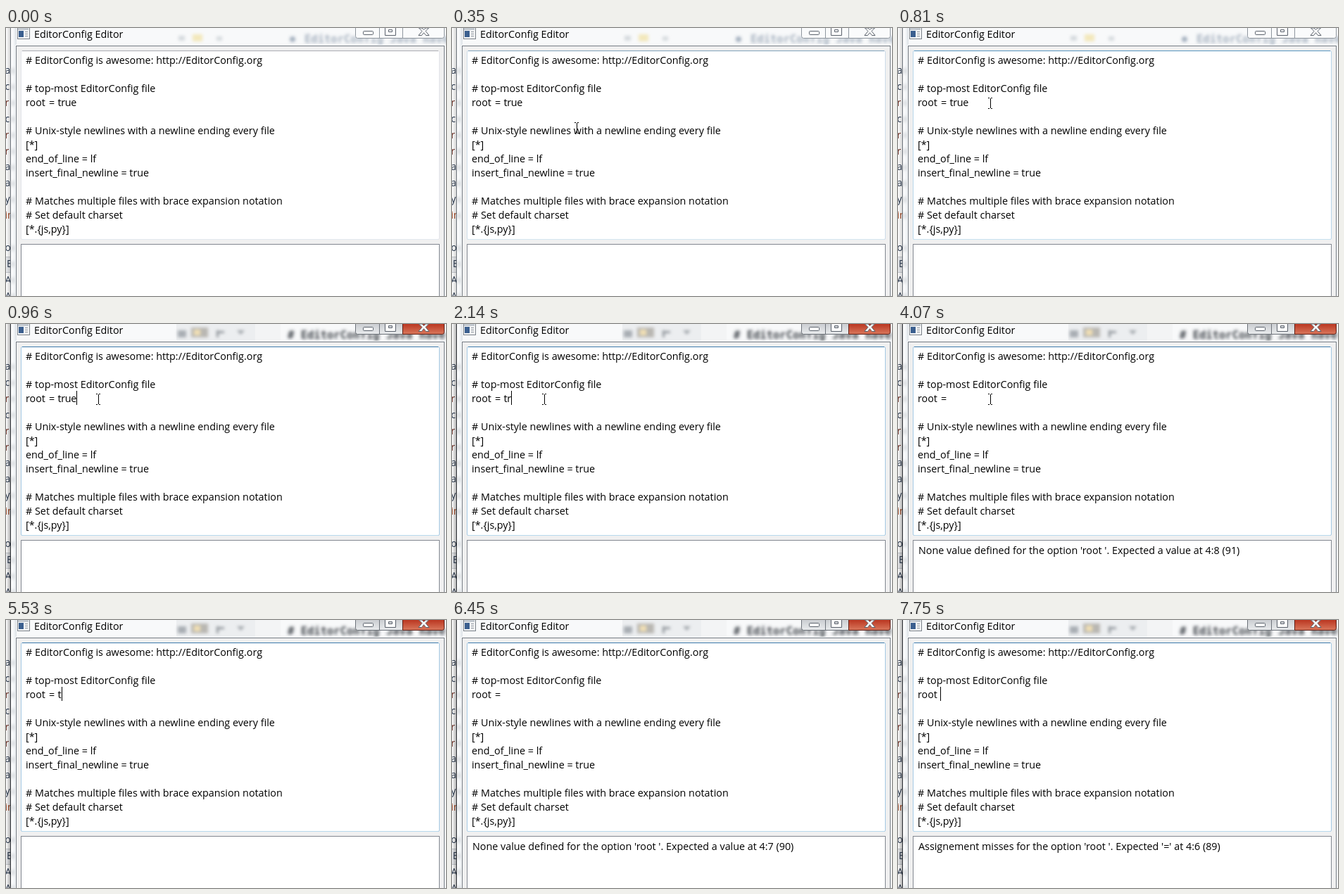
Animation, 625 px wide and 381 px high, one loop 8000 ms. Source, as an HTML page:

```html
<!DOCTYPE html>
<html lang="en">
<head>
<meta charset="utf-8">
<title>EditorConfig Editor</title>
<style>
  html, body { margin: 0; width: 100%; height: 100%; overflow: hidden; background: #fff; }
  svg { display: block; width: 625px; height: 381px; }
  text { font: 14.33px "Open Sans", "Noto Sans", sans-serif; fill: #000; white-space: pre; }
  #value { letter-spacing: -.35px; }
  #behind text { font-size: 14px; }
  .blur text { font: bold 15.5px "DejaVu Sans Mono", monospace; }
  .crisp { shape-rendering: crispEdges; }
  .glyph { fill: #fff; stroke: #5b626c; }
</style>
</head>
<body>
<svg viewBox="0 0 625 381">
  <defs>
    <filter id="soft" x="-20%" y="-80%" width="140%" height="260%"><feGaussianBlur stdDeviation="2"/></filter>
    <linearGradient id="strip">
      <stop offset="0" stop-color="#fff"/><stop offset=".5" stop-color="#f4f6f8"/><stop offset="1" stop-color="#dce1e6"/>
    </linearGradient>
    <linearGradient id="shade">
      <stop offset="0" stop-color="#000" stop-opacity="0"/><stop offset="1" stop-color="#000" stop-opacity=".3"/>
    </linearGradient>
    <linearGradient id="grey" x2="0" y2="1">
      <stop offset="0" stop-color="#c9ccd0"/><stop offset="1" stop-color="#e9ebed"/>
    </linearGradient>
    <linearGradient id="red" x2="0" y2="1">
      <stop offset="0" stop-color="#b8321d"/><stop offset="1" stop-color="#d9775c"/>
    </linearGradient>
    <clipPath id="left"><rect width="6" height="381"/></clipPath>
    <clipPath id="bar"><rect x="8" width="617" height="25"/></clipPath>
  </defs>

  <rect width="625" height="381" fill="#fff"/>
  <g id="behind" clip-path="url(#left)">
    <rect y="325" width="6" height="23" fill="#e8eaed"/>
    <path class="crisp" d="M0 325.5h6M0 347.5h6" stroke="#c4c8cd"/>
  </g>
  <rect id="shadow" width="6" height="381" fill="url(#shade)"/>

  <rect x="7" width="618" height="381" fill="#f8f9fa"/>
  <rect x="7" width="8" height="381" fill="url(#strip)"/>
  <g id="smudges" filter="url(#soft)" fill="#8d949c" opacity=".35"></g>
  <path id="edge" class="crisp" d="M6.5 0V381" stroke="#555b62"/>

  <g id="idle" clip-path="url(#bar)">
    <g class="blur" filter="url(#soft)">
      <g opacity=".5">
        <circle cx="407" cy="16" r="4" fill="#536a85"/>
        <text x="424" y="21" style="fill:#536a85">EditorConfig Java have</text>
      </g>
      <path d="M245 11h9v7h-9zM299 12h8v6h-8z" fill="#d6dade"/>
      <path d="M265 9h14v10h-14z" fill="#f3e8bc"/>
    </g>
    <path d="M496.5-1V11.5q0 3 3 3H619.500q3 0 3-3V-1M530.500-1V14.500M563.500-1V14.500" fill="#fafbfc" stroke="#8f969e"/>
  </g>
  <g id="active" clip-path="url(#bar)">
    <rect x="242" width="112" height="25" fill="#eceef0"/>
    <rect x="354" width="36" height="25" fill="#f3f4f5"/>
    <g class="blur" filter="url(#soft)">
      <text x="400" y="21" style="fill:#3d4248"># EditorConfig Java have</text>
      <path d="M244 9h12v10h-12z" fill="#a8adb3"/>
      <path d="M263 5h24v14h-24z" fill="#b9b7b2"/>
      <path d="M267 8h9v8h-9z" fill="#f0dfb4"/>
      <path d="M299 9h3v10h-3zM302 10h8v3h-8z" fill="#92979d"/>
      <path d="M328 9h11l-5.500 6z" fill="#a0a5aa"/>
    </g>
    <path d="M496.500-1V11.500q0 3 3 3H563.500V-1z" fill="url(#grey)" stroke="#6d737a"/>
    <path d="M530.500-1V14.500" stroke="#6d737a"/>
    <path d="M563.500-1V14.500H619.500q3 0 3-3V-1z" fill="url(#red)" stroke="#5f2018"/>
  </g>
  <g class="glyph">
    <rect x="507.500" y="4.500" width="14" height="5" rx="1"/>
    <path d="M538.500-1V10.500h15V-1M543.500 2.500h5v3h-5z"/>
    <path d="M586.500 0l4.500 4.500-5 6h4.500l3-3.800 3 3.800h4.500l-5-6 4.500-4.500h-4.500l-2.500 2.500-2.500-2.500z"/>
  </g>

  <g class="crisp">
    <rect x="16" y="-1" width="17" height="16" fill="#f4f5f6" stroke="#7b828a"/>
    <rect x="18" y="4" width="7" height="9" fill="#3b5f8f"/>
    <path d="M17 1.500H32" stroke="#c3c9d0" stroke-width="3"/>
    <path d="M27 5.500h4M27 8.500h4M27 11.500h4" stroke="#8a9199"/>
  </g>
  <text x="40" y="14">EditorConfig Editor</text>

  <g class="crisp">
    <rect x="13.500" y="24.500" width="610" height="370" fill="none" stroke="#fbfcfd"/>
    <rect x="14.500" y="25.500" width="608" height="370" fill="#f0f0f0" stroke="#737a82"/>
    <rect x="21.500" y="307.500" width="594" height="90" fill="#fff" stroke="#828790"/>
  </g>
  <rect id="box" x="21.500" y="32.500" width="594" height="268" rx="1.500" fill="#fff"/>
  <path id="boxTop" class="crisp" d="M23 32.500H614"/>
  <path id="boxEnd" class="crisp" d="M23 300.500H614"/>

  <g id="lines"></g>
  <text x="28" y="111">root<tspan id="equals" x="61">=</tspan><tspan id="value" x="73.500"></tspan></text>
  <text id="message" x="29" y="327"></text>
  <rect id="caret" class="crisp" y="95" width="1" height="20"/>
  <path id="pointer" class="crisp" d="M-3-7.500H-1M1-7.500H3M0.500-7V7M-3 7.500H-1M1 7.500H3" fill="none" stroke="#000"/>
</svg>

<script>
const $ = id => document.getElementById(id);
const LOOP = 8000;

const addText = (parent, x, y, string, color = "#000") => {
  const t = document.createElementNS("http://www.w3.org/2000/svg", "text");
  t.setAttribute("x", x);
  t.setAttribute("y", y);
  t.style.fill = color;
  t.textContent = string;
  parent.append(t);
};

[
  "# EditorConfig is awesome: http://EditorConfig.org", "",
  "# top-most EditorConfig file", "", "",
  "# Unix-style newlines with a newline ending every file",
  "[*]", "end_of_line = lf", "insert_final_newline = true", "",
  "# Matches multiple files with brace expansion notation",
  "# Set default charset", "[*.{js,py}]"
].forEach((line, i) => addText($("lines"), 28, 51 + 20 * i, line));

// Clipped ends of the list behind the window
["a", "c", "r", "c", "r", "r", "a", "a", "y", "in", "", "o", "E", "A-", "A"].forEach((s, i) => {
  const color = s === "in" ? "#a0421c" : s === "r" ? "#6b2b20" : "#2b3a50";
  const y = 65 + 22.9 * i;
  addText($("behind"), s === "E" ? 1 : -1.5, y, s, color);
  if (s) $("smudges").insertAdjacentHTML("beforeend", `<rect x="8" y="${y - 8}" width="4" height="8"/>`);
});

const noValue = at => `None value defined for the option 'root '. Expected a value at ${at}`;
const noEquals = "Assignement misses for the option 'root '. Expected '=' at 4:6 (89)";

// time, value, caret x (0 = hidden), message, equals sign
const edits = [
  [0, "true", 0], [960, "true", 100], [1430, "true", 0],
  [1900, "tru", 92], [2140, "tr", 84], [2370, "t", 79],
  [2530, "", 74, noValue("4:8 (91)")], [2990, "", 0, noValue("4:8 (91)")],
  [3520, "", 74, noValue("4:8 (91)")], [4070, "", 0, noValue("4:8 (91)")],
  [4530, "t", 79], [5070, "t", 0], [5530, "t", 79],
  [5760, "", 74, noValue("4:8 (91)")],
  [5990, "", 70, noValue("4:7 (90)")], [6450, "", 0, noValue("4:7 (90)")],
  [6680, "", 60, noEquals, ""], [7210, "", 0, noEquals, ""], [7750, "", 60, noEquals, ""]
];

// top, sides and bottom of the text box border
const border = {
  normal: [[171, 173, 179], [226, 227, 234], [227, 233, 239]],
  hover: [[87, 148, 191], [183, 213, 234], [199, 226, 241]],
  focus: [[61, 123, 173], [164, 201, 227], [183, 217, 237]]
};
const mix = (a, b, k) => `rgb(${a.map((v, i) => Math.round(v + (b[i] - v) * k))})`;
const show = (id, on) => $(id).style.display = on ? "" : "none";

function drawPointer(t, step) {
  show("pointer", t >= 70 && t < 4530);
  const k = 1 - (1 - step) ** 2;
  const y = t >= 810 ? 107 : t >= 730 ? 104 : 268 - 168 * k;
  $("pointer").setAttribute("transform", `translate(${Math.round(316 - 185 * k)} ${Math.round(y)})`);
}

function draw(t) {
  const [, value, caret, message = "", equals = "="] = edits.findLast(e => e[0] <= t);
  $("value").textContent = value;
  $("equals").textContent = equals;
  $("message").textContent = message;
  show("caret", caret);
  $("caret").setAttribute("x", caret);

  const active = t >= 960;
  show("active", active);
  show("idle", !active);
  $("shadow").style.opacity = active ? 1 : .55;
  $("edge").style.stroke = active ? "#2c3035" : "#6f767e";

  const step = Math.min(6, Math.max(0, Math.floor((t - 70) / 85))) / 6;
  drawPointer(t, step);
  const to = active ? border.focus : border.hover;
  const colors = border.normal.map((c, i) => mix(c, to[i], step));
  ["boxTop", "box", "boxEnd"].forEach((id, i) => $(id).style.stroke = colors[i]);
}

const start = performance.now();
function tick() {
  draw((performance.now() - start) % LOOP);
  requestAnimationFrame(tick);
}
tick();
</script>
</body>
</html>
```
